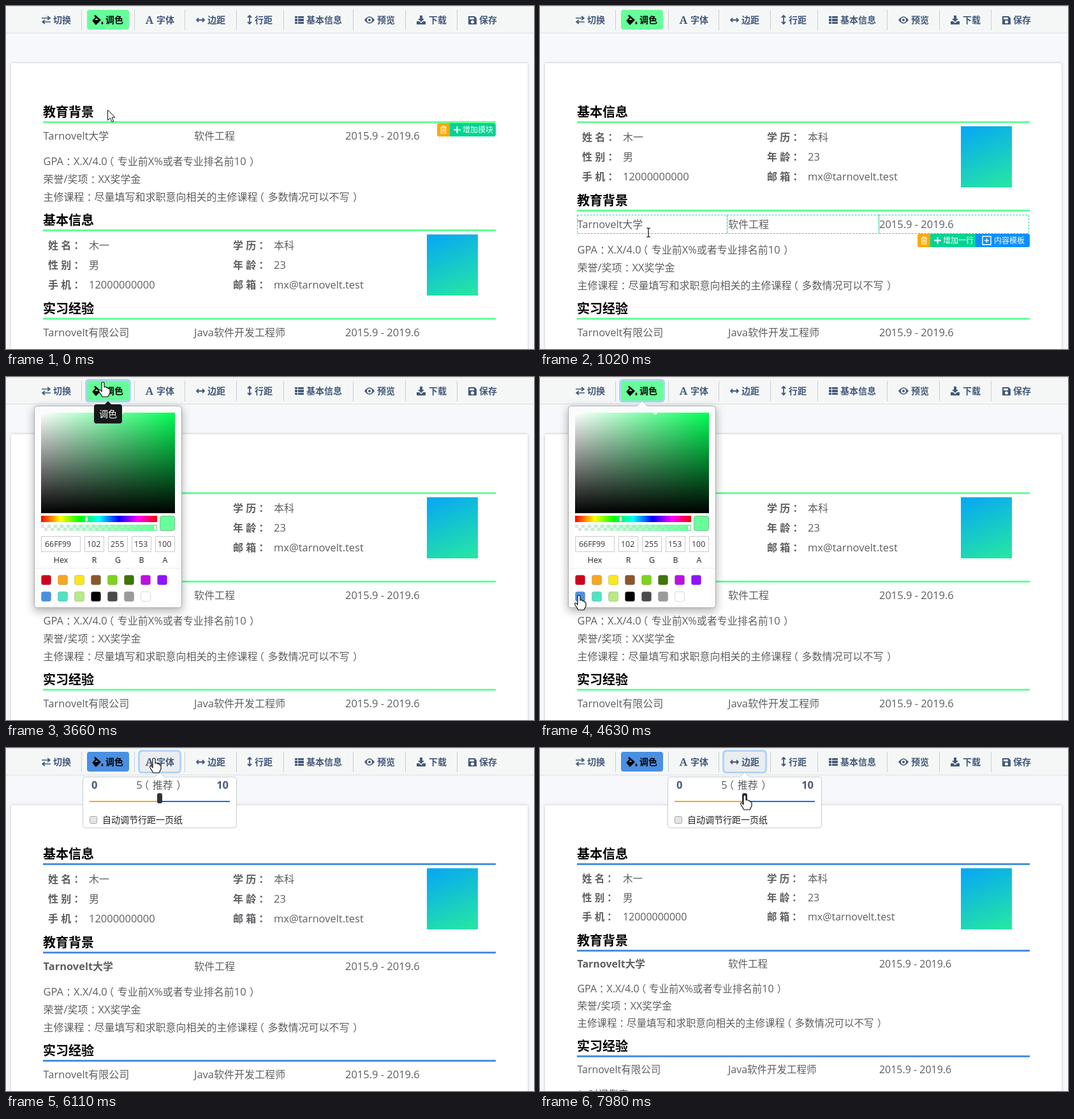
These frames come from a looping animation (828x539 px, 8000 ms). An HTML page with a canvas:

```html
<!DOCTYPE html>
<html lang="zh-CN">
<head>
<meta charset="utf-8">
<title>简历编辑器</title>
<style>
html, body { margin: 0; width: 100%; height: 100%; overflow: hidden; background: #f6f8fb; }
canvas { display: block; }
</style>
</head>
<body>
<canvas id="stage" width="828" height="539"></canvas>
<script>
const ctx = document.getElementById('stage').getContext('2d');
const FONT = '"Open Sans", "Noto Sans CJK SC", "Noto Sans CJK", sans-serif';
const LOOP = 8000, GREEN = '#66ff99', BLUE = '#4a90e2', INK = '#5c5e61', NAVY = '#44597a';
const LATIN_SCALE = 1.03;
const within = (t, a, b) => t >= a && t < b;

// Drawing helpers

// Splits text by script: Latin is set slightly larger, wide punctuation is centred in its em cell.
function textRuns(s, size, weight) {
  return String(s).split(/([：（）]|[\x20-\x7e]+)/).filter(Boolean).map(run => {
    const wide = /[：（）]/.test(run);
    const font = `${weight} ${/[\x20-\x7e]/.test(run) ? size * LATIN_SCALE : size}px ${FONT}`;
    ctx.font = font;
    const m = ctx.measureText(run);
    const shift = wide ? size / 2 - (m.actualBoundingBoxRight - m.actualBoundingBoxLeft) / 2 : 0;
    return { run, font, shift, width: wide ? size : m.width };
  });
}
function text(s, x, cy, size = 16, color = INK, weight = 400, align = 'left') {
  ctx.textAlign = 'left';
  const runs = textRuns(s, size, weight);
  const width = runs.reduce((sum, r) => sum + r.width, 0);
  let left = x - width * { left: 0, center: .5, right: 1 }[align];
  ctx.fillStyle = color;
  for (const r of runs) {
    ctx.font = r.font;
    ctx.fillText(r.run, left + r.shift, cy + size * .37);
    left += r.width;
  }
  return width;
}
function serif(s, x, baseline, style, color) {
  ctx.font = `${style} "Noto Serif", serif`;
  ctx.textAlign = 'center';
  ctx.fillStyle = color;
  ctx.fillText(s, x, baseline);
}
function rect(x, y, w, h, color) {
  ctx.fillStyle = color;
  ctx.fillRect(x, y, w, h);
}
function box(x, y, w, h, radius, fill, stroke, width = 1) {
  ctx.beginPath();
  ctx.roundRect(x, y, w, h, radius);
  if (fill) { ctx.fillStyle = fill; ctx.fill(); }
  if (stroke) { ctx.strokeStyle = stroke; ctx.lineWidth = width; ctx.stroke(); }
}
function shape(d, x, y, { fill, stroke, width = 1.8 }) {
  const path = new Path2D(d);
  ctx.save();
  ctx.translate(x, y);
  ctx.lineJoin = 'round';
  if (fill) { ctx.fillStyle = fill; ctx.fill(path, 'evenodd'); }
  if (stroke) { ctx.strokeStyle = stroke; ctx.lineWidth = width; ctx.stroke(path); }
  ctx.restore();
}
function shadow(color, blur, dy, draw) {
  ctx.save();
  ctx.shadowColor = color;
  ctx.shadowBlur = blur;
  ctx.shadowOffsetY = dy;
  draw();
  ctx.restore();
}
function gradient(x0, y0, x1, y1, ...colors) {
  const g = ctx.createLinearGradient(x0, y0, x1, y1);
  colors.forEach((c, i) => g.addColorStop(i / (colors.length - 1), c));
  return g;
}

// Cursor: time, x, y
const PATH = [
  [0, 159, 163], [180, 159, 163], [630, 164, 400], [880, 164, 400], [1020, 170, 356],
  [1250, 164, 345], [1350, 164, 345], [1600, 58, 345], [1750, 58, 345], [2150, 157, 258],
  [2450, 157, 258], [2630, 170, 229], [3000, 165, 165], [3330, 152, 18], [3450, 152, 8],
  [3700, 152, 8], [4180, 75, 358], [4550, 61, 343], [5200, 61, 343], [5850, 205, 60],
  [6050, 232, 16], [6200, 232, 16], [6650, 241, 74], [6800, 241, 74], [7150, 219, 74],
  [7280, 219, 74], [7540, 316, 15], [7680, 316, 15], [7950, 321, 74], [LOOP, 321, 74]
];
const KINDS = [
  [0, 'arrow'], [950, 'beam'], [1950, 'hand'], [2580, 'beam'], [3260, 'hand'], [3780, 'arrow'],
  [4260, 'hand'], [5400, 'arrow'], [5950, 'hand'], [6330, 'arrow'], [6560, 'hand']
];
function cursorAt(t) {
  const i = PATH.findIndex(k => k[0] > t);
  const [t0, x0, y0] = PATH[i - 1], [t1, x1, y1] = PATH[i];
  const u = (t - t0) / (t1 - t0), e = u * u * (3 - 2 * u);
  return { x: x0 + (x1 - x0) * e, y: y0 + (y1 - y0) * e };
}
function drawCursor({ x, y }, kind) {
  if (kind === 'beam') {
    shape('M-3-7H-1L0-6L1-7H3M0-6V6M-3 7H-1L0 6L1 7H3', x, y, { stroke: '#111', width: 1.2 });
  } else if (kind === 'arrow') {
    shape('M.5.5V16.5L4.3 13L7 19L9.6 18L7 12H12Z', x, y, { fill: '#fff', stroke: '#111', width: 1 });
  } else {
    shape('M-2 2Q-2 0 0 0Q2 0 2 2V8Q5 6.5 5.5 9Q8 8 8.5 10.5Q11 10 11 13V17L8 23H-1L-6 15Q-7 12-5 12Q-4 12-2 15Z',
      x, y, { fill: '#fff', stroke: '#111', width: 1.2 });
  }
}

// Toolbar
const TOOLS = [
  ['切换', 74], ['调色', 156], ['字体', 236], ['边距', 316], ['行距', 390],
  ['基本信息', 471], ['预览', 582], ['下载', 663], ['保存', 742]
];
function focusRing(x, w, fill) {
  box(x - 3, 3, w + 6, 37, 6, '#b2d4f7');
  box(x, 6, w, 31, 4, fill);
}
function drawToolbar(t, accent) {
  rect(0, 0, 828, 43, '#f5f7f7');
  rect(0, 0, 828, 1, '#dfe2e4');
  rect(0, 42, 828, 1, '#dbe0e4');
  for (const x of [118, 201, 280, 361, 435, 544, 626, 707]) rect(x, 6, 1, 32, '#c9ced2');
  if (within(t, 3400, 4800)) focusRing(127, 66, accent);
  else box(127, 6, 66, 31, 4, accent);
  if (within(t, 6060, 6800)) focusRing(210, 62, '#eaeef1');
  if (t >= 7620) focusRing(289, 64, '#eaeef1');
  TOOLS.forEach(([s, x], i) => text(s, x, 22, 14, i === 1 ? '#000' : NAVY, 700));
  const line = { stroke: NAVY }, solid = { fill: NAVY };
  shape('M0 3H12M9 0L13 3L9 6M14 9H2M5 6L1 9L5 12', 56, 16, { stroke: NAVY, width: 1.6 });
  shape('M2 0L4-1L13 7L6 14Q5 15 4 14L0 9Q-1 8 0 7L4 3ZM3 7H9L6 4ZM15 9Q18 13 15 14Q12 13 15 9Z', 136, 15, { fill: '#000' });
  serif('A', 225, 28, '700 17px', NAVY);
  shape('M1 6H13M4 3L1 6L4 9M10 3L13 6L10 9', 298, 16, line);
  shape('M4 1V14M1 4L4 1L7 4M1 11L4 14L7 11', 378, 14, line);
  shape('M0 0H4V3H0ZM5 0H14V3H5ZM0 4H4V8H0ZM5 4H14V8H5ZM0 9H4V12H0ZM5 9H14V12H5Z', 453, 16, solid);
  shape('M0 6Q8-5 16 6Q8 17 0 6ZM4 6A4 4 0 1 0 12 6A4 4 0 1 0 4 6ZM6 6A2 2 0 1 0 10 6A2 2 0 1 0 6 6Z', 562, 16, solid);
  shape('M5 0H9V5H12L7 10L2 5H5ZM0 9H4L7 12L10 9H14V14H0Z', 644, 15, solid);
  shape('M0 0H10L13 3V13H0ZM2 2V5H9V2ZM4 9A2.3 2.3 0 1 0 9 9A2.3 2.3 0 1 0 4 9Z', 725, 16, solid);
}

// Resume modules; "tight" is 0 at 16px and 1 at 15.5px
function heading(s, y, accent) {
  text(s, 58, y + 17, 20, '#000', 700);
  rect(58, y + 31, 710, 3, accent);
}
function entry(y, cells, size, firstWeight = 400) {
  cells.forEach((s, i) => text(s, [58.5, 295, 532][i], y, size, INK, i ? 400 : firstWeight));
}
function drawBasic(y, accent, tight) {
  const size = 16 - tight / 2;
  heading('基本信息', y, accent);
  [['姓 名', '木一', '学 历', '本科'], ['性 别', '男', '年 龄', '23'],
   ['手 机', '12000000000', '邮 箱', 'mx@tarnovelt.test']].forEach((row, i) => row.forEach((s, j) => {
    const label = j % 2 === 0;
    text(label ? s + '：' : s, [66, 130, 356, 420][j], y + 56 - tight + (31 - tight) * i, size, INK, label ? 700 : 400);
  }));
  rect(660, y + 39, 80, 96, gradient(680, y + 39, 720, y + 135, '#08aaf0', '#24e5a5'));
}
function drawEducation(y, accent, tight, bold) {
  const size = 16 - tight / 2;
  heading('教育背景', y, accent);
  entry(y + 54 - tight, ['Tarnovelt大学', '软件工程', '2015.9 - 2019.6'], size, bold ? 700 : 400);
  ['GPA：X.X/4.0（专业前X%或者专业排名前10）', '荣誉/奖项：XX奖学金',
   '主修课程：尽量填写和求职意向相关的主修课程（多数情况可以不写）'].forEach((s, i) =>
    text(s, 58.5, y + 94 - 2 * tight + (28 - tight) * i, size));
}
function drawWork(y, accent, tight) {
  const size = 16 - tight / 2;
  heading('实习经验', y, accent);
  entry(y + 54 - tight, ['Tarnovelt有限公司', 'Java软件开发工程师', '2015.9 - 2019.6'], size);
  text('1. 时间倒序', 58.5, y + 94 - 2 * tight, size);
}

function actionButtons(x, y, label, template) {
  box(x, y, 20, 21, [3, 0, 0, 3], '#ffa90a');
  shape('M0 2H10M3 2V0H7V2M1.5 2V11H8.5V2M4 4V9M6 4V9', x + 5, y + 5, { stroke: '#fff', width: 1.2 });
  box(x + 20, y, 72, 21, template ? 0 : [0, 3, 3, 0], '#00d492');
  shape('M0 5H11M5.5-.5V10.5', x + 26, y + 5.5, { stroke: '#fff', width: 2 });
  text(label, x + 40, y + 11, 12, '#fff');
  if (!template) return;
  box(x + 91, y, 85, 21, [0, 3, 3, 0], '#0d8fff');
  shape('M0 0H13V13H0ZM3 6.5H10M6.5 3V10', x + 102, y + 4, { stroke: '#fff', width: 1.4 });
  text('内容模板', x + 120, y + 11, 12, '#fff');
}

function drawCellFocus(t, cursor, bold) {
  shadow('#6d6df0', 7, 0, () => box(58, 328, 236, 29, 2, '#fff', '#5b86f2', 2));
  const weight = bold ? 700 : 400, s = 'Tarnovelt大学';
  const right = 59 + text(s, 58.5, 343, 16, INK, weight);
  if (t < 1350) return;
  const left = t < 1600 ? Math.min(cursor.x, right) : 58;
  ctx.save();
  ctx.beginPath();
  ctx.rect(left, 333, right - left, 21);
  ctx.clip();
  rect(58, 333, 240, 21, '#2f8cf5');
  text(s, 58.5, 343, 16, '#fff', weight);
  ctx.restore();
}

function drawEditorBar(bold) {
  const white = { stroke: '#fff' }, dim = { stroke: '#8d959d', width: 1.6 };
  shape('M-9 0H9L0 9Z', 176, 320, { fill: '#111a24' });
  box(58.5, 241.5, 591, 78, 3, '#222f3e', '#000');
  rect(58, 280, 592, 1, '#000');
  for (const x of [135, 280, 549]) rect(x, 242, 1, 38, '#000');
  for (const x of [167, 278, 388, 430]) rect(x, 281, 1, 38, '#000');
  if (bold) box(140, 244, 34, 34, 3, '#757e87');
  const undo = 'M6 0L1 4.5L6 9M1 4.5H11Q16 5 15 13';
  shape(undo, 71, 254, white);
  ctx.save();
  ctx.translate(123, 254);
  ctx.scale(-1, 1);
  shape(undo, 0, 0, { stroke: '#7a838c' });
  ctx.restore();
  text('B', 157, 261, 18, '#fff', 700, 'center');
  serif('I', 191, 268, 'italic 19px', '#fff');
  shape('M1 0V6Q1 10 5 10Q9 10 9 6V0M0 14H11', 219.5, 254, white);
  text('S', 259, 261, 17, '#fff', 400, 'center');
  shape('M0 0H16', 251, 262, white);
  text('墨川细黑', 292, 261, 14, '#fff');
  text('12pt', 423, 262, 14, '#fff');
  for (const [x, y] of [[403, 261], [533, 261], [471, 300]]) shape('M-5-2L0 3L5-2', x, y, dim);
  for (const x of [105, 155, 325, 375]) shape('M-2-5L3 0L-2 5', x, 300, dim);
  text('A', 80, 299, 15, '#fff', 700, 'center');
  rect(71, 306, 18, 3, '#fff');
  shape('M3 9L13-1L17 3L9 10H3Z', 120, 294, { fill: '#fff' });
  rect(120, 306, 18, 3, '#fff');
  [0, 3, 6].forEach((inset, align) => {
    const x = [181, 215, 249][align];
    for (let i = 0; i < 4; i++) {
      const w = i % 2 ? 10 : 16;
      rect(x + (16 - w) * align / 2, 293 + i * 4, w, 2, '#fff');
    }
  });
  for (let i = 0; i < 3; i++) {
    text(i + 1, 291, 294 + i * 6, 7, '#fff', 700);
    rect(297, 293 + i * 6, 10, 2, '#fff');
    box(342, 292.5 + i * 6, 3, 3, 1.5, '#fff');
    rect(348, 293 + i * 6, 10, 2, '#fff');
  }
  text('Ω', 409, 300, 20, '#fff', 400, 'center');
  shape('M0 0H16V13H0ZM0 4.5H16M0 9H16M5.5 0V13M10.5 0V13', 443, 293.5, { stroke: '#fff', width: 1.4 });
}

// Popovers
function popover(x, y, w, h, tip, blur, border) {
  shadow('rgba(0,0,0,.3)', blur, blur / 3, () => box(x + .5, y + .5, w - 1, h - 1, 4, '#fff', border));
  shape('M-8 1L0-7L8 1', tip, y, { fill: '#fff', stroke: '#c8ccd0', width: 1 });
  rect(tip - 8, y + 1, 16, 2, '#fff');
}
const SWATCHES = '#d0021b #f5a623 #f8e71c #8b572a #7ed321 #417505 #bd10e0 #9013fe #4a90e2 #50e3c2 #b8e986 #000000 #4a4a4a #9b9b9b #ffffff'.split(' ');
function drawPicker(blue, tooltip) {
  const color = blue ? BLUE : GREEN;
  const [hue, sat, val] = blue ? [212, .67, .89] : [140, .6, 1];
  popover(44, 45, 232, 318, 160, 14, '#a9adb1');
  rect(55, 56, 210, 158, `hsl(${hue} 100% 50%)`);
  rect(55, 56, 210, 158, gradient(55, 0, 265, 0, '#fff', 'rgba(255,255,255,0)'));
  rect(55, 56, 210, 158, gradient(0, 214, 0, 56, '#000', 'rgba(0,0,0,0)'));
  ctx.save();
  ctx.beginPath();
  ctx.rect(55, 56, 210, 158);
  ctx.clip();
  box(53 + sat * 210, 54 + (1 - val) * 158, 4, 4, 2, null, '#fff', 1.5);
  ctx.restore();
  rect(55, 218, 182, 10, gradient(55, 0, 237, 0, '#f00', '#ff0', '#0f0', '#0ff', '#00f', '#f0f', '#f00'));
  for (let i = 0; i < 36; i++) rect(55 + i * 5, 232 + i % 2 * 5, 5, 5, '#e2e2e2');
  rect(55, 232, 182, 10, gradient(55, 0, 237, 0, color + '00', color));
  box(53.5 + hue / 360 * 182, 219, 4, 8, 1, '#fff', '#999', .5);
  box(232, 233, 4, 8, 1, '#fff', '#999', .5);
  box(241.5, 218.5, 23, 23, 3, color, 'rgba(0,0,0,.25)');
  const values = blue ? ['4A90E2', 74, 144, 226, 100] : ['66FF99', 102, 255, 153, 100];
  values.forEach((v, i) => {
    const x = [55, 123, 160, 197, 234][i], w = i ? 31 : 62;
    box(x + .5, 250.5, w - 1, 24, 0, '#fff', '#ccc');
    text(v, x + (i ? 4 : 6), 263, 12, '#333');
    text(['Hex', 'R', 'G', 'B', 'A'][i], x + w / 2, 288, 12, '#222', 400, 'center');
  });
  rect(45, 300, 230, 1, '#eee');
  SWATCHES.forEach((c, i) =>
    box(55.5 + i % 8 * 26, 311.5 + (i > 7) * 26, 15, 15, 3, c, 'rgba(0,0,0,.15)'));
  if (tooltip) {
    shape('M-6 5L0-1L6 5Z', 160, 39, { fill: '#151a18' });
    box(138, 43, 44, 30, 4, '#151a18');
    text('调色', 160, 58, 14, '#fff', 400, 'center');
  }
}
function drawSlider(x, value) {
  const knob = x + 11 + value * 22;
  popover(x, 45, 242, 81, x + 121, 0, '#c8ccd0');
  text('0', x + 14, 58.5, 16, NAVY, 700);
  text(value === 5 ? '5（推荐）' : Math.round(value), x + 121, 58.5, 16, INK, 400, 'center');
  text('10', x + 229, 58.5, 16, NAVY, 700, 'right');
  rect(x + 11, 83, knob - x - 11, 2, '#ffa50a');
  rect(knob, 83, x + 231 - knob, 2, '#0d72e8');
  box(knob - 4, 71, 8, 16, 3, '#30343a');
  box(x + 11.5, 107.5, 11, 11, 2, '#e4e4e4', '#a5a5a5');
  text('自动调节行距一页纸', x + 31, 113, 14, '#222');
}

function draw(t) {
  const cursor = cursorAt(t);
  const accent = t < 5080 ? GREEN : BLUE;
  const bold = t >= 2230, tight = t >= 7000 ? 1 : 0, swapped = t >= 460;
  const basicY = swapped ? 150 : 320;
  const educationY = swapped ? 289 - 3 * tight : 150;

  rect(0, 0, 828, 539, '#f6f8fb');
  shadow('rgba(0,0,0,.22)', 4, 0, () => rect(8, 90, 810, 470, '#fff'));
  drawBasic(basicY, accent, tight);
  drawEducation(educationY, accent, tight, bold);
  drawWork(459 - 7 * tight, accent, tight);

  const onHeading = within(t, 2560, 3330) && within(cursor.y, 150, 184);
  if (t < 200 || onHeading) actionButtons(676, 184, '增加模块');
  if (within(t, 200, 880)) {
    ctx.save();
    ctx.globalAlpha = .6;
    ctx.translate(cursor.x - 159, cursor.y - 163);
    rect(58, 150, 710, 170, '#fff');
    drawEducation(150, accent, 0, false);
    ctx.restore();
  }
  if (within(t, 950, 1740)) {
    ctx.save();
    ctx.setLineDash([3, 2]);
    ctx.strokeStyle = '#2bcf90';
    ctx.lineWidth = 1;
    for (const [x, w] of [[58.5, 235], [293.5, 238], [531.5, 235]]) ctx.strokeRect(x, 328.5, w, 29);
    ctx.restore();
    actionButtons(592, 358, '增加一行', true);
  }
  if (within(t, 1280, 3050)) drawCellFocus(t, cursor, bold);
  if (within(t, 1740, 3050)) drawEditorBar(bold);

  drawToolbar(t, accent);
  if (within(t, 3420, 5960)) drawPicker(t >= 4800, t < 3780);
  if (within(t, 6060, 7620)) {
    drawSlider(120, t < 6800 ? 5 : t < 7150 ? (cursor.x - 131) / 22 : 4);
  }
  if (t >= 7620) drawSlider(200, 5);
  drawCursor(cursor, KINDS.findLast(k => k[0] <= t)[1]);
}

function frame(now) {
  draw(now % LOOP);
  requestAnimationFrame(frame);
}
requestAnimationFrame(frame);
</script>
</body>
</html>
```
